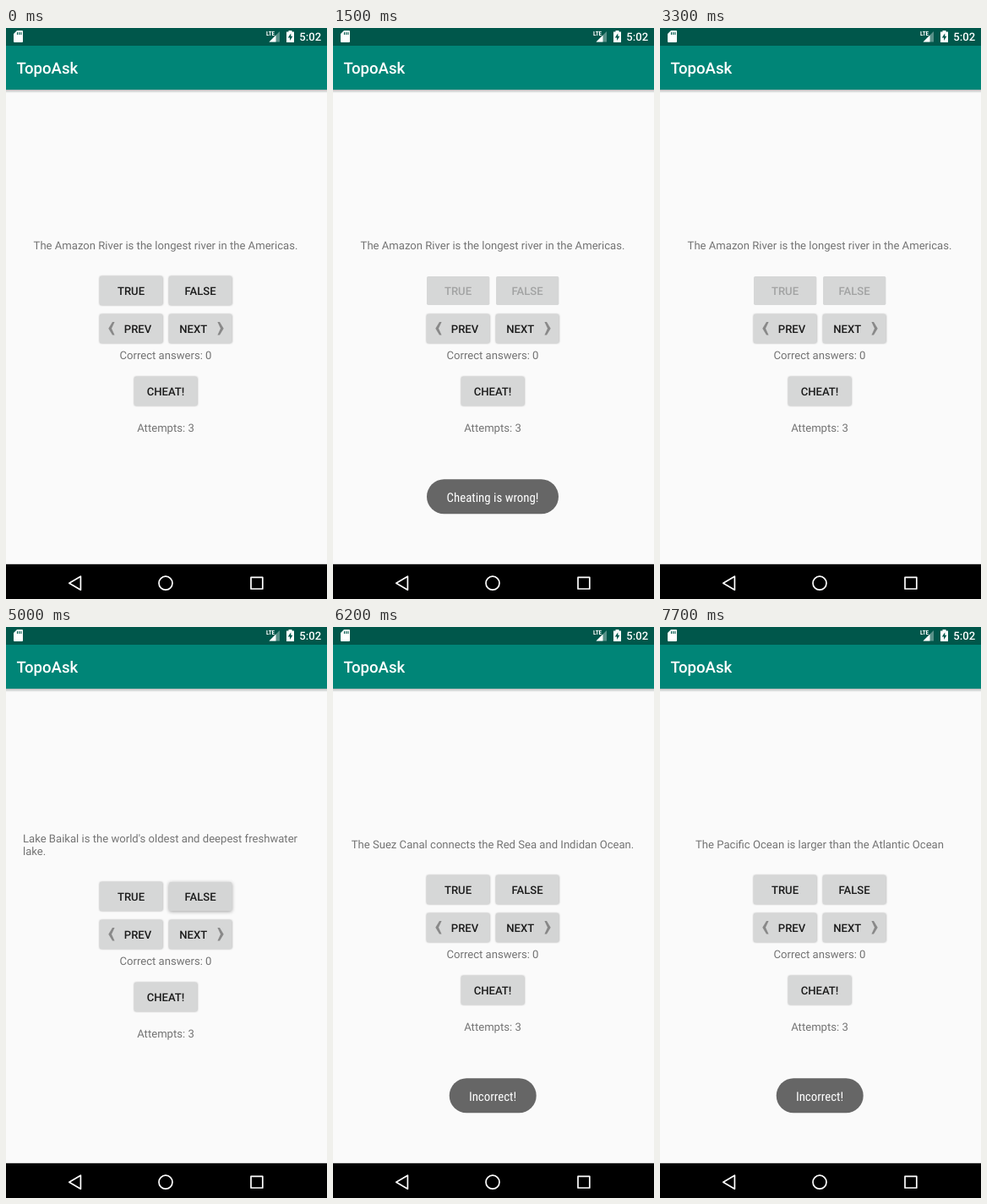
Recreate the animation shown at these times as an HTML page. Size 380 by 676 pixels, loop 8 s.

```html
<!DOCTYPE html>
<html lang="en">
<head>
<meta charset="utf-8">
<title>Quiz app</title>
<style>
  html, body { margin: 0; width: 100%; height: 100%; overflow: hidden; background: #fafafa; }
  svg { display: block; width: 100%; height: 100%; }
  text { font: 400 13.1px Roboto, sans-serif; fill: #737373; text-rendering: geometricPrecision; }
  .mid { text-anchor: middle; }
  .button text { font-weight: 500; fill: #1c1c1c; text-anchor: middle; }
  .button rect { fill: #d6d7d7; filter: drop-shadow(0 .8px 1px rgba(0, 0, 0, .36)); }
  .button.pressed rect { fill: #d4d5d5; filter: drop-shadow(0 1.2px 2.2px rgba(0, 0, 0, .36)); }
  .button.disabled rect { filter: none; }
  .button.disabled text { fill: #a2a3a3; }
  .chevron { fill: #898989; }
  .toast rect { fill: #666; }
  .toast text, .network { font-family: "Roboto Condensed", Roboto, sans-serif; font-stretch: 75%; fill: #fff; }
  .toast text { font-size: 14.9px; text-anchor: middle; }
  .network { font-size: 7.2px; font-weight: 700; }
</style>
</head>
<body>
<svg viewBox="0 0 380 676">
  <defs>
    <linearGradient id="shade" x2="0" y2="1">
      <stop stop-color="#000" stop-opacity=".26"/>
      <stop offset="1" stop-color="#000" stop-opacity="0"/>
    </linearGradient>
  </defs>
  <rect width="380" height="676" fill="#fafafa"/>

  <rect y="21" width="380" height="52" fill="#008577"/>
  <rect y="73" width="380" height="4" fill="url(#shade)"/>
  <rect width="380" height="21" fill="#00574b"/>
  <text x="12.5" y="54" style="font-size:18.6px;font-weight:500;fill:#fff">TopoAsk</text>

  <g id="status" fill="#fff">
    <path d="M13 3H19Q20 3 20 4V16Q20 17 19 17H10Q9 17 9 16V7Z"/>
    <path d="M13.5 5v3M15.7 5v3M17.9 5v3" stroke="#00574b" stroke-width="1.1"/>
    <path d="M324 4V16.5H311.5Z" opacity=".35"/>
    <path d="M319.5 8.5V16.5H311.5Z"/>
    <text class="network" x="308" y="9">LTE</text>
    <path d="M334.5 3H338.5V4.4H341V17H332V4.4H334.5Z"/>
    <path d="M337.3 6.2L333.8 11.4H336.1V15L339.4 9.8H337.3Z" fill="#00574b"/>
    <text x="347.3" y="15" style="font-weight:500;fill:#fff">5:02</text>
  </g>

  <g id="questions">
    <text class="mid" x="189" y="262.3">The Amazon River is the longest river in the Americas.</text>
    <text y="255"><tspan x="20">Lake Baikal is the world's oldest and deepest freshwater</tspan><tspan x="20" dy="15.2">lake.</tspan></text>
    <text class="mid" x="189" y="262.3">The Suez Canal connects the Red Sea and Indidan Ocean.</text>
    <text class="mid" x="189" y="262.3">The Pacific Ocean is larger than the Atlantic Ocean</text>
  </g>

  <g id="controls">
    <g class="button" id="true"><rect x="111" y="294" width="74.4" height="34" rx="1.8"/><text x="148" y="316">TRUE</text></g>
    <g class="button" id="false"><rect x="193" y="294" width="74.4" height="34" rx="1.8"/><text x="230" y="316">FALSE</text></g>
    <g class="button"><rect x="111" y="339" width="74.4" height="34" rx="1.8"/><text x="156" y="361">PREV</text></g>
    <g class="button"><rect x="193" y="339" width="74.4" height="34" rx="1.8"/><text x="221.8" y="361">NEXT</text></g>
    <path class="chevron" d="M128.6 348H126L121.3 355.7L126 363.4H128.6L125 355.7Z"/>
    <path class="chevron" d="M250.4 348H253L257.7 355.7L253 363.4H250.4L254 355.7Z"/>
    <rect id="ripple" x="193" y="339" width="74.4" height="34" rx="1.8"/>
    <text class="mid" x="189" y="392.3">Correct answers: 0</text>
    <g class="button"><rect x="152" y="413" width="74.4" height="34" rx="1.8"/><text x="189" y="435">CHEAT!</text></g>
    <text class="mid" x="189" y="478">Attempts: 3</text>
  </g>

  <g id="toasts">
    <g class="toast"><rect x="111" y="534.3" width="156" height="41" rx="20.5"/><text x="189" y="560.5">Cheating is wrong!</text></g>
    <g class="toast"><rect x="137.7" y="534.3" width="103" height="41" rx="20.5"/><text x="189" y="560.5">Incorrect!</text></g>
    <g class="toast"><rect x="137.7" y="534.3" width="103" height="41" rx="20.5"/><text x="189" y="560.5">Incorrect!</text></g>
  </g>

  <rect y="634.8" width="380" height="41.2" fill="#000"/>
  <g fill="none" stroke="#fff" stroke-width="1.7" stroke-linejoin="round">
    <path d="M74.8 657.2L88.4 649.2V665.2Z"/>
    <circle cx="189" cy="657.2" r="8"/>
    <rect x="290" y="650.4" width="13.8" height="13.6"/>
  </g>
</svg>
<script>
const LOOP = 8000, STEP = 100, FADE = 400;
const byId = id => document.getElementById(id);
const questions = [...byId('questions').children];
const toasts = [...byId('toasts').children];
const questionStarts = [0, 4300, 6200, 7300];
const nextTaps = [4300, 6100, 7300];
const answers = [
  { button: 'true', at: 1000 },
  { button: 'false', at: 5000 },
  { button: 'true', at: 6500 },
];
const toastTimes = [
  { show: 1050, hide: 2860 },
  { show: 5050, hide: 6890 },
  { show: 7050, hide: 9000 },
];

const clamp = v => Math.min(1, Math.max(0, v));
const toastOpacity = (t, { show, hide }) => {
  const enter = clamp((t - show) / FADE), leave = clamp((t - hide) / FADE);
  return (1 - (1 - enter) ** 2) * (1 - leave ** 2);
};

function rippleOpacity(t) {
  const age = t - nextTaps.findLast(tap => tap <= t);
  return age < 100 ? 0.08 : age < 300 ? 0.015 : 0;
}

function render(t) {
  const current = questionStarts.findLastIndex(start => start <= t);
  questions.forEach((q, i) => q.style.display = i === current ? '' : 'none');
  byId('controls').setAttribute('transform', `translate(0 ${current === 1 ? 8 : 0})`);

  const answer = answers.find(a => a.at >= questionStarts[current]);
  const pressed = answer && t >= answer.at && t < answer.at + STEP;
  const disabled = answer && t >= answer.at + STEP;
  for (const id of ['true', 'false']) {
    const { classList } = byId(id);
    classList.toggle('pressed', !!pressed && answer.button === id);
    classList.toggle('disabled', !!disabled);
  }

  byId('ripple').setAttribute('opacity', rippleOpacity(t));
  toasts.forEach((toast, i) => toast.setAttribute('opacity', toastOpacity(t, toastTimes[i])));
}

const origin = performance.now();
function tick() {
  const elapsed = (performance.now() - origin) % LOOP;
  render(Math.floor(elapsed / STEP) * STEP);
  requestAnimationFrame(tick);
}
tick();
</script>
</body>
</html>
```
